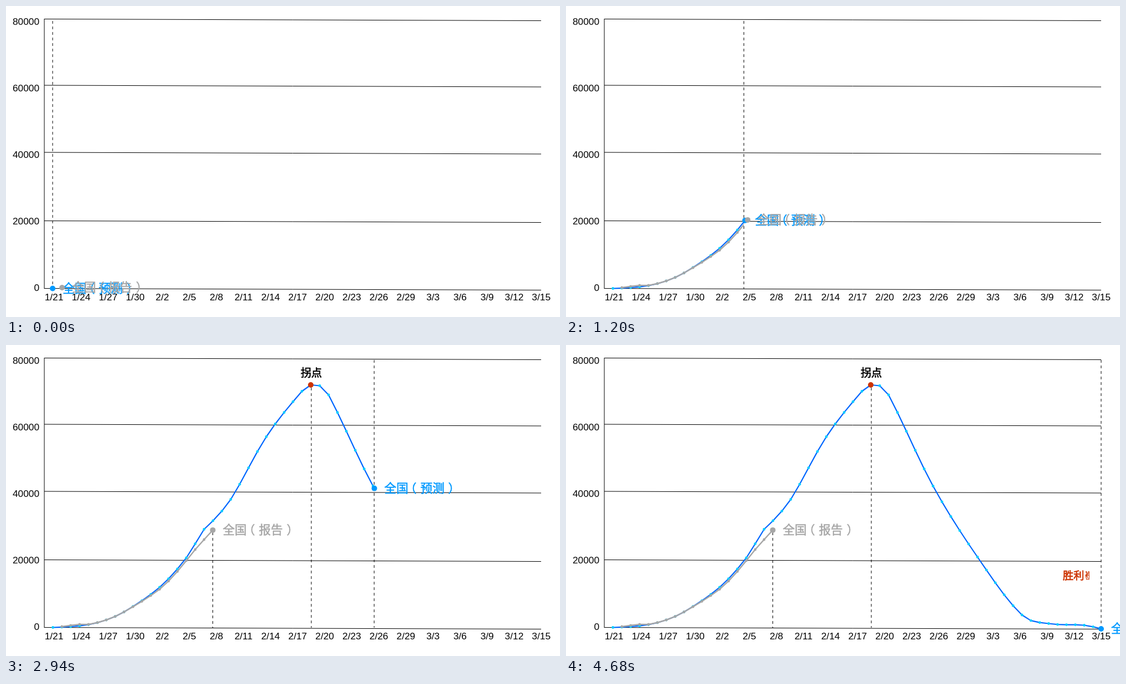
These frames come from a looping animation (998 by 561 pixels, 5400 ms). An HTML page with a canvas:

```html
<!DOCTYPE html>
<html lang="zh-CN">
<head>
<meta charset="utf-8">
<title>预测曲线</title>
<style>
html, body { margin: 0; width: 100%; height: 100%; overflow: hidden; background: #fff; }
canvas { display: block; width: 998px; height: 561px; }
</style>
</head>
<body>
<canvas id="stage" width="998" height="561"></canvas>
<script>
const ctx = document.getElementById('stage').getContext('2d');
const LOOP = 5400, STEP = 30;
const LEFT = 84, RIGHT = 964, SPEED = 0.197;
const FIRST_DAY_X = 84.5, DAY = 16.02;
const FADE = 210, SLIDE = 20;
const HAN = '"Noto Sans CJK SC", "Noto Sans CJK", sans-serif';
const BLUE = '#0099ff', GRAY = '#a6a6a6', RED = '#cc3300', INK = '#000';

// Key points of each curve: [day, y]
const forecast = dailyCurve([[0, 509.5], [2, 508], [4, 504.5], [6, 496], [8, 481.5],
  [12, 437], [15, 384], [17, 332.5], [18, 317], [20, 278.5], [24, 165.5], [28, 83.5],
  [29, 72], [30, 73.5], [31, 90], [36, 254.5], [41, 382.5], [46, 487], [49, 502.5],
  [53, 505.5], [55, 512]]);
const report = dailyCurve([[1, 508], [3, 504], [4, 504], [6, 496], [8, 481.5],
  [12, 440.5], [14, 408.5], [16, 369], [18, 333.5]]);

// Head positions over time: [ms, x]
const forecastPath = [[0, LEFT], [1200, 322.5], [2280, 529.5], [2490, 575], [4467, RIGHT]];
const reportPath = [[0, 101], [570, 199.5], [1423, 372.5]];
const peak = { x: 549, y: 72, time: 2363 };
const reportEnd = { x: 372.5, time: 1423 };
const victoryTime = 4467;

// Smooth curve through the key points, sampled once a day
function dailyCurve(keys) {
  const slope = i => {
    const a = keys[Math.max(0, i - 1)], b = keys[Math.min(keys.length - 1, i + 1)];
    return (b[1] - a[1]) / (b[0] - a[0]);
  };
  const points = [];
  for (let i = 0; i < keys.length - 1; i++) {
    const [d0, y0] = keys[i], [d1, y1] = keys[i + 1], span = d1 - d0;
    for (let day = d0; day < d1; day++) {
      const u = (day - d0) / span, v = 1 - u;
      const y = v * v * (1 + 2 * u) * y0 + u * u * (1 + 2 * v) * y1
        + u * v * span * (v * slope(i) - u * slope(i + 1));
      points.push([FIRST_DAY_X + DAY * day, y]);
    }
  }
  const [day, y] = keys[keys.length - 1];
  points.push([Math.min(RIGHT, FIRST_DAY_X + DAY * day), y]);
  return points;
}

function interpolate(points, x) {
  if (x <= points[0][0]) return points[0][1];
  for (let i = 1; i < points.length; i++) {
    const [x0, y0] = points[i - 1], [x1, y1] = points[i];
    if (x <= x1) return y0 + (y1 - y0) * (x - x0) / (x1 - x0);
  }
  return points[points.length - 1][1];
}

function line(x0, y0, x1, y1, dash = []) {
  ctx.strokeStyle = INK;
  ctx.lineWidth = 1;
  ctx.setLineDash(dash);
  ctx.beginPath();
  ctx.moveTo(x0, y0);
  ctx.lineTo(x1, y1);
  ctx.stroke();
  ctx.setLineDash([]);
}

const dashed = (x, top, bottom) => line(x, top, x, bottom, [5, 5]);

function dot(x, y, r, color) {
  ctx.fillStyle = color;
  ctx.beginPath();
  ctx.arc(x, y, r, 0, Math.PI * 2);
  ctx.fill();
}

function text(str, x, y, font, color, align = 'left') {
  ctx.font = font;
  ctx.fillStyle = color;
  ctx.textAlign = align;
  ctx.fillText(str, x, y);
}

// Chinese text with a medium weight
function hanText(str, x, y, size, color, weight = 0.5, family = HAN) {
  text(str, x, y, `${size}px ${family}`, color);
  ctx.strokeStyle = color;
  ctx.lineWidth = weight;
  ctx.strokeText(str, x, y);
}

function drawAxes() {
  const font = '17.3px "Liberation Sans", Arial, sans-serif';
  [23.5, 143, 264, 387.5, 509.5].forEach((y, i) => {
    line(69, y, RIGHT, y + 3);
    text(String(80000 - i * 20000), 60, 34 + 120.1 * i, font, INK, 'right');
  });
  line(69, 23, 69, 510);
  for (let i = 0; i < 19; i++) {
    const date = new Date(2020, 0, 21 + i * 3);
    text(`${date.getMonth() + 1}/${date.getDate()}`, 86.5 + 48.76 * i, 531, font, INK, 'center');
  }
}

function drawCurve(points, limit, color, width, pointColor) {
  ctx.save();
  ctx.beginPath();
  ctx.rect(0, 0, limit, 561);
  ctx.clip();
  ctx.strokeStyle = color;
  ctx.lineWidth = width;
  ctx.lineJoin = 'round';
  ctx.beginPath();
  points.forEach(([x, y]) => ctx.lineTo(x, y));
  ctx.stroke();
  points.forEach(([x, y]) => dot(x, y, 2.4, pointColor));
  ctx.restore();
}

function drawHead(points, x, word, color) {
  const y = interpolate(points, x), base = y + 7.2;
  dot(x, y, 5, color);
  hanText('全国', x + 18, base, 21.6, color);
  hanText('（', x + 54.5, base, 21.6, color);
  hanText(word, x + 83, base, 21.6, color);
  hanText('）', x + 133, base, 21.6, color);
}

// Fades in while rising to its resting place
function appear(time, start, draw) {
  const p = Math.max(0, Math.min(1, (time - start) / FADE));
  if (p === 0) return;
  ctx.save();
  ctx.globalAlpha = p;
  draw(SLIDE * (1 - p));
  ctx.restore();
}

function render(time) {
  ctx.fillStyle = '#fff';
  ctx.fillRect(0, 0, 998, 561);
  drawAxes();

  const sweep = Math.min(RIGHT, LEFT + SPEED * time);
  dashed(sweep, 27, 510);
  appear(time, reportEnd.time, () => dashed(reportEnd.x, 338, 510));
  appear(time, peak.time + FADE, () => dashed(peak.x + 1, 77, 510));

  drawCurve(forecast, sweep, '#0066ff', 2.2, '#00ccff');
  drawHead(forecast, interpolate(forecastPath, time), '预测', BLUE);

  drawCurve(report, sweep, GRAY, 2.5, GRAY);
  drawHead(report, interpolate(reportPath, time), '报告', GRAY);

  appear(time, peak.time, rise => {
    dot(peak.x, peak.y, 5, RED);
    hanText('拐点', 531, 57 + rise, 19, INK, 0.7);
  });
  appear(time, victoryTime, rise => {
    hanText('胜利', 895, 423 + rise, 19.3, RED, 0.7);
    hanText('✌\uFE0E', 931.5, 423 + rise, 20, RED, 0.4, '"DejaVu Sans", sans-serif');
  });
}

const began = performance.now();
function tick() {
  const time = (performance.now() - began) % LOOP;
  render(Math.floor(time / STEP) * STEP);
  requestAnimationFrame(tick);
}
tick();
</script>
</body>
</html>
```
